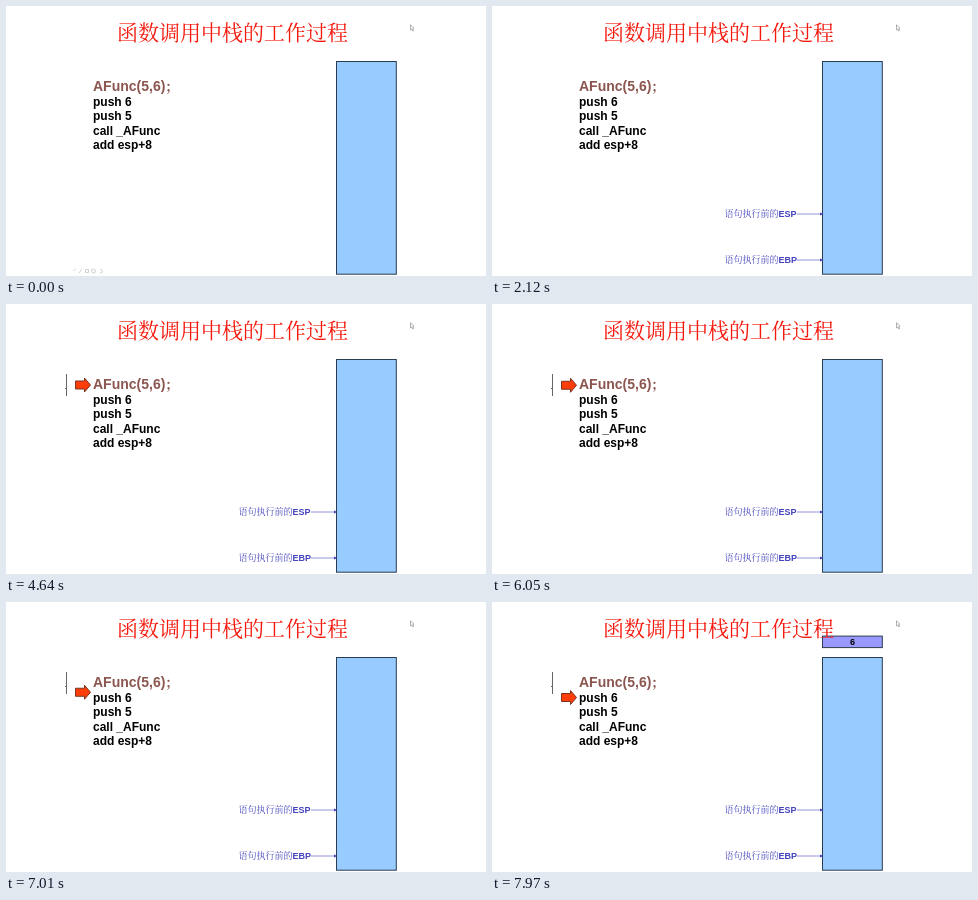
These frames come from a looping animation (480 by 270 pixels, 8 s). An HTML page with a canvas:

```html
<!DOCTYPE html>
<html lang="zh-CN">
<head>
<meta charset="utf-8">
<title>函数调用中栈的工作过程</title>
<style>
html, body { margin: 0; width: 100%; height: 100%; overflow: hidden; background: #fff; }
canvas { display: block; width: 480px; height: 270px; }
</style>
</head>
<body>
<canvas id="stage" width="480" height="270"></canvas>
<script>
const ctx = document.getElementById("stage").getContext("2d");
const LOOP = 8000, STEP = 30, PHASE = 20;
const CJK = '"Noto Serif CJK SC", "Noto Sans CJK SC", "Noto Sans CJK", serif';
const ARIAL = '"Liberation Sans", Arial, sans-serif';

const clamp = v => Math.max(0, Math.min(1, v));
const progress = (t, from, to) => clamp((t - from) / (to - from));
const smooth = p => p < 0.5 ? 2 * p * p : 1 - 2 * (1 - p) * (1 - p);

function text(str, x, y, font, color, align = "left") {
  ctx.font = font;
  ctx.fillStyle = color;
  ctx.textAlign = align;
  ctx.fillText(str, x, y);
}

function box(x, y, w, h, fill) {
  ctx.fillStyle = fill;
  ctx.fillRect(x, y, w, h);
  ctx.strokeStyle = "#2a3d50";
  ctx.lineWidth = 1;
  ctx.strokeRect(x, y, w, h);
}

function polygon(points, fill, stroke, width = 1) {
  ctx.beginPath();
  points.forEach(([x, y]) => ctx.lineTo(x, y));
  ctx.closePath();
  ctx.fillStyle = fill;
  ctx.fill();
  if (stroke) {
    ctx.strokeStyle = stroke;
    ctx.lineWidth = width;
    ctx.stroke();
  }
}

function clipped(x, y, w, h, draw) {
  ctx.save();
  ctx.beginPath();
  ctx.rect(x, y, w, h);
  ctx.clip();
  draw();
  ctx.restore();
}

function code() {
  text("AFunc(5,6)", 87, 85, "bold 14px " + ARIAL, "#8c5650");
  text("；", 159, 85, "bold 13px " + CJK, "#8c5650");
  ["push 6", "push 5", "call _AFunc", "add esp+8"].forEach((line, i) =>
    text(line, 87, 100 + i * 14.4, "bold 12px " + ARIAL, "#000"));
}

function mouse() {
  polygon([[404.5, 18.8], [404.5, 24], [405.8, 23], [406.8, 25], [407.6, 24.5],
    [406.8, 22.6], [408, 22.2]], "#fff", "#909090", 0.7);
}

function controls() {
  ctx.strokeStyle = "#d0d0d0";
  ctx.lineWidth = 1;
  ctx.beginPath();
  ctx.moveTo(69.5, 263); ctx.lineTo(67.5, 265);
  ctx.moveTo(73, 267); ctx.lineTo(76, 263);
  ctx.rect(79.5, 263.5, 3, 3);
  ctx.moveTo(89.5, 265); ctx.arc(87.5, 265, 2, 0, 7);
  ctx.moveTo(94, 263); ctx.lineTo(97, 265.5); ctx.lineTo(94, 267.5);
  ctx.stroke();
}

function pointer(name, y) {
  const blue = "#4444bc";
  text("语句执行前的", 232.5, y + 3, "9px " + CJK, blue);
  text(name, 286.5, y + 3, "bold 9px " + ARIAL, blue);
  ctx.strokeStyle = "#9292d8";
  ctx.lineWidth = 1;
  ctx.beginPath();
  ctx.moveTo(305, y + 0.5);
  ctx.lineTo(329, y + 0.5);
  ctx.stroke();
  polygon([[328, y - 1], [331.5, y + 0.5], [328, y + 2]], blue);
}

function marker(dx, dy) {
  const shape = [[69.5, 77], [78.5, 77], [78.5, 74], [84.5, 81],
    [78.5, 88], [78.5, 85], [69.5, 85]];
  clipped(60, 60, 40, 60, () =>
    polygon(shape.map(([x, y]) => [x + dx, y + dy]), "#ff3d08", "#7a3420"));
}

function edgeMark() {
  ctx.fillStyle = "#666";
  ctx.fillRect(60, 70, 1, 22);
  ctx.fillRect(59, 84, 1, 1);
}

function render(time) {
  const t = Math.max(0, Math.floor((time - PHASE) / STEP) * STEP + PHASE);
  ctx.fillStyle = "#fff";
  ctx.fillRect(0, 0, 480, 270);

  box(330.5, 55.5, 59.8, 212.7, "#98cbff");
  code();
  mouse();
  if (t < 1400) controls();

  const wipe = progress(t, 1640, 2120);
  if (wipe > 0) clipped(232, 200, 100 * wipe, 62, () => {
    pointer("ESP", 207.5);
    pointer("EBP", 253.5);
  });

  if (t >= 4220) {
    const dx = -25 * (1 - progress(t, 4173, 4640));
    marker(dx, 14.5 * smooth(progress(t, 5860, 7860)));
  }
  if (t >= 4340) edgeMark();

  if (t >= 7910) {
    const y = 0.5 + (t - 7910) * 0.56;
    box(330.5, y, 59.8, 11.5, "#9999ff");
    text("6", 360.5, y + 9, "bold 9px " + ARIAL, "#000", "center");
  }
  text("函数调用中栈的工作过程", 111, 34, "21px " + CJK, "#f5180c");
}

function tick() {
  render(performance.now() % LOOP);
  requestAnimationFrame(tick);
}
tick();
</script>
</body>
</html>
```
